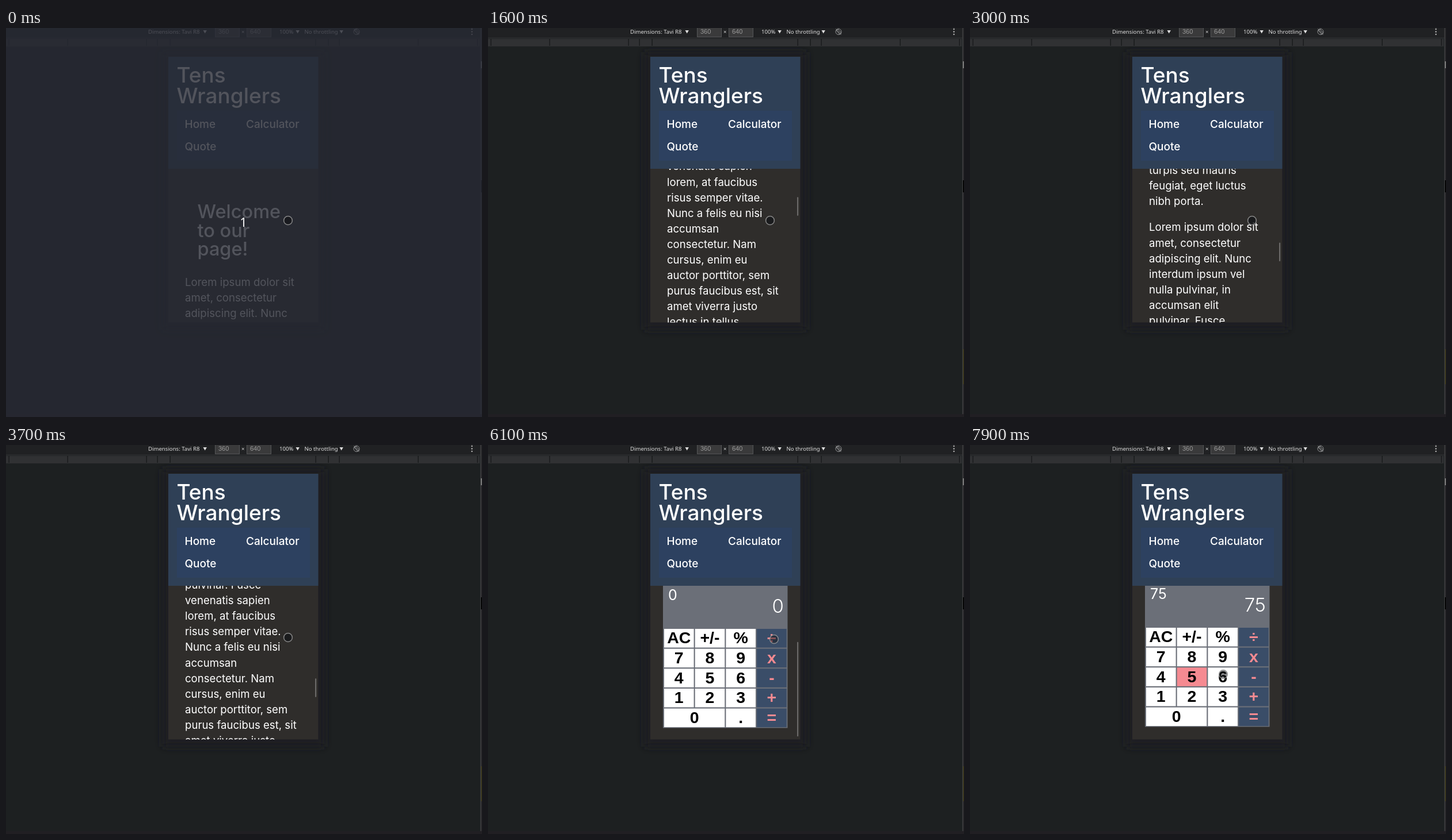
Write an HTML page that moves like this. It is 827 px wide and 677 px high and loops after 8 s.

```html
<!DOCTYPE html>
<html lang="en">
<head>
<meta charset="utf-8">
<style>
  html, body { margin: 0; width: 100%; height: 100%; overflow: hidden; background: #1d2021; }
  svg { display: block; }
  text { fill: #fff; font-family: Inter, sans-serif; }
  .title { font-size: 37px; font-weight: 500; }
  .nav { font-size: 19px; font-weight: 500; }
  .heading { font-size: 32.5px; font-weight: 500; }
  .body { font-size: 18.6px; }
  .bar { font: 9.6px "Noto Sans", sans-serif; fill: #dedede; }
  .size { font: 11px "Liberation Sans", Arial, sans-serif; fill: #9b9b9b; }
  .key { font: bold 28.5px "Liberation Sans", Arial, sans-serif; text-anchor: middle; fill: #000; }
  .op { fill: #f58a91; }
  .small { font-size: 25px; }
  .big { font-size: 33px; font-weight: 300; text-anchor: end; }
  .count { font: 21px "Noto Sans", sans-serif; text-anchor: middle; }
</style>
</head>
<body>
<svg id="stage" width="827" height="677" viewBox="0 0 827 677"></svg>
<script>
const rect = (x, y, w, h, fill, more = '') =>
  `<rect x="${x}" y="${y}" width="${w}" height="${h}" fill="${fill}" ${more}/>`;
const text = (x, y, cls, str, more = '') => `<text x="${x}" y="${y}" class="${cls}" ${more}>${str}</text>`;
const lines = (x, y, step, cls, list) => list.map((s, i) => text(x, y + i * step, cls, s)).join('');
const arrow = x => `<path d="M${x} 4h6.4l-3.2 5.6z" fill="#dedede"/>`;

const paragraph = `Lorem ipsum dolor sit|amet, consectetur|adipiscing elit. Nunc|interdum ipsum vel
nulla pulvinar, in|accumsan elit|pulvinar. Fusce|venenatis sapien|lorem, at faucibus
risus semper vitae.|Nunc a felis eu nisi|accumsan|consectetur. Nam|cursus, enim eu
auctor porttitor, sem|purus faucibus est, sit|amet viverra justo|lectus in tellus.|Integer vel massa.
Sed mattis ultrices|lorem eget|accumsan. Mauris|sagittis nisi ac|sodales vehicula.
Aenean rutrum ornare|sagittis. In|condimentum|pellentesque metus.|Etiam rhoncus vitae
lectus ac tempor.|Vivamus dapibus|turpis sed mauris|feugiat, eget luctus|nibh porta.`.split(/[|\n]/);

function toolbar() {
  const ticks = [5, 107, 244, 263, 285, 538, 560, 579, 716, 819];
  return rect(0, 0, 827, 18, '#202123') + rect(0, 17, 824, 1, '#353638') + rect(0, 19, 823, 13, '#303133')
    + ticks.map(x => rect(x - .5, 19, 1.3, 12, '#17191a')).join('')
    + text(247, 10, 'bar', 'Dimensions: Tavi R8') + arrow(342.5)
    + [363, 418].map(x => rect(x + .5, -3.5, 42, 19, '#3a3a3b', 'stroke="#555658"')).join('')
    + text(369, 10, 'size', '360') + text(424, 10, 'size', '640') + text(409, 10, 'bar', '×')
    + text(475, 10, 'bar', '100%') + arrow(503.5) + text(518.5, 10, 'bar', 'No throttling') + arrow(579.5)
    + '<g fill="none" stroke="#98999a"><circle cx="609" cy="6.5" r="5"/>'
    + '<path d="M605 4l3-2 6 7-3 2zM604.5 1.5l9 10"/></g>'
    + [2, 6.5, 11].map(y => `<circle cx="809.5" cy="${y}" r="1.2" fill="#bbb"/>`).join('');
}

function edges() {
  return rect(824, 0, 3, 677, '#2b2b2d') + rect(824, 0, 1, 677, '#414244')
    + rect(825, 58, 2, 12, '#777') + rect(825, 265, 2, 21, '#050505') + rect(825, 559, 2, 61, '#3b371f')
    + rect(0, 672, 827, 5, '#211f23');
}

function calculator() {
  const rows = ['AC +/- % ÷', '7 8 9 x', '4 5 6 -', '1 2 3 +', '0 _ . ='];
  let out = rect(304, 393, 216.5, 253.5, '#6b6f78')
    + text(313, 423.5, 'small', '0', 'id="entry"') + text(514, 446, 'big', '0', 'id="total"');
  rows.forEach((row, r) => row.split(' ').forEach((key, c) => {
    if (key === '_') return;
    const wide = key === '0', op = c === 3;
    const x = 306 + c * 53.7, y = 474 + r * 34.65, w = wide ? 105.3 : 51.6;
    out += rect(x, y, w, 32.5, op ? '#3a4d68' : '#fff', `data-key="${key}"`)
      + text(x + w / 2, y + 25.3, op ? 'key op' : 'key', key);
  }));
  return out;
}

document.getElementById('stage').innerHTML = `
  <defs>
    <clipPath id="view">${rect(282, 245, 260.5, 267.5, '#fff')}</clipPath>
    <filter id="blur" x="-20%" y="-20%" width="140%" height="140%"><feGaussianBlur stdDeviation="7"/></filter>
  </defs>
  ${rect(0, 0, 827, 677, '#1d2021')}
  ${rect(272, 42, 281, 483, '#1f1e20', 'filter="url(#blur)"')}
  ${toolbar()}${edges()}
  ${rect(282, 50, 260.5, 462.5, '#2f2d2b')}
  <g clip-path="url(#view)">
    <g id="home">
      ${lines(332.5, 331, 32.5, 'heading', ['Welcome', 'to our', 'page!'])}
      ${lines(311, 449, 27.1, 'body', paragraph)}
      ${lines(311, 449 + 34 * 27.1 + 18, 27.1, 'body', paragraph)}
    </g>
    <g id="calc">
      ${lines(325.5, 294, 32.5, 'heading', ["Let's do", 'some', 'math!'])}
      ${calculator()}
    </g>
    <rect id="thumb" x="537" width="2.2" rx="1" fill="#6b6968"/>
  </g>
  ${rect(282, 50, 260.5, 195, '#2f4056')}${rect(297, 144, 231, 87, '#2d4160')}
  ${lines(296.5, 95, 36.3, 'title', ['Tens', 'Wranglers'])}
  ${text(310.5, 173.5, 'nav', 'Home')}${text(417, 173.5, 'nav', 'Calculator')}${text(310.5, 213, 'nav', 'Quote')}
  <g id="intro">${rect(0, 0, 827, 677, '#272a34', 'opacity=".8"')}${text(412.5, 346, 'count', '1')}</g>
  <circle id="pointer" r="7.4" fill="#14161a" stroke="#999" stroke-width="1.5" stroke-opacity=".85"/>`;

// Each key is [time, ...values].
const homeScroll = [[400, 0], [600, 40], [900, 157], [1100, 200], [1300, 200], [1700, 455], [1800, 455],
  [2200, 698], [2300, 698], [2600, 880], [2700, 880], [3300, 1190], [3700, 1301], [3900, 1325]];
const calcScroll = [[5000, 0], [5400, 85], [5700, 150], [6000, 150], [6100, 154], [6200, 156]];
const pointerPath = [[3800, 490, 335], [4400, 468, 163], [4600, 468, 164], [4900, 476, 242], [5000, 476, 242],
  [5700, 497, 330], [6000, 497, 332], [6100, 497, 338], [6400, 496, 352], [6500, 496, 352], [6900, 342, 370],
  [7200, 342, 370], [7500, 388, 404], [7700, 413, 411], [7800, 413, 411], [7900, 440, 399]];

function at(keys, t) {
  const i = keys.findIndex(k => k[0] > t);
  if (i < 0) return keys[keys.length - 1].slice(1);
  if (i === 0) return keys[0].slice(1);
  const a = keys[i - 1], b = keys[i], p = (t - a[0]) / (b[0] - a[0]);
  return a.slice(1).map((v, j) => v + (b[j + 1] - v) * p);
}

const el = id => document.getElementById(id);
const show = (id, on) => el(id).setAttribute('display', on ? 'inline' : 'none');
const set = (node, attrs) => Object.entries(attrs).forEach(([k, v]) => node.setAttribute(k, v));
const key = k => document.querySelector(`[data-key="${k}"]`);

function draw(now) {
  const t = Math.floor(now % 8000 / 100) * 100;
  const onCalc = t >= 4600;
  const [scroll] = at(onCalc ? calcScroll : homeScroll, t);
  const [x, y] = at(pointerPath, t);
  const value = t < 7100 ? '0' : t < 7500 ? '7' : '75';

  show('intro', t < 200);
  show('home', !onCalc);
  show('calc', onCalc);
  show('thumb', t >= 500 && t < 6700);
  set(el(onCalc ? 'calc' : 'home'), { transform: `translate(0 ${-scroll})` });
  set(el('thumb'), onCalc
    ? { y: 248 + scroll * .616, height: 164.5 }
    : { y: 246 + scroll * .1232, height: 32.5 });
  el('entry').textContent = el('total').textContent = value;
  set(key('7'), { fill: value === '7' ? '#f58a91' : '#fff' });
  set(key('5'), { fill: value === '75' ? '#f58a91' : '#fff' });
  set(el('pointer'), { cx: x, cy: y, 'fill-opacity': t < 6000 ? .75 : .5 });
  requestAnimationFrame(() => draw(performance.now()));
}
draw(0);
</script>
</body>
</html>
```
